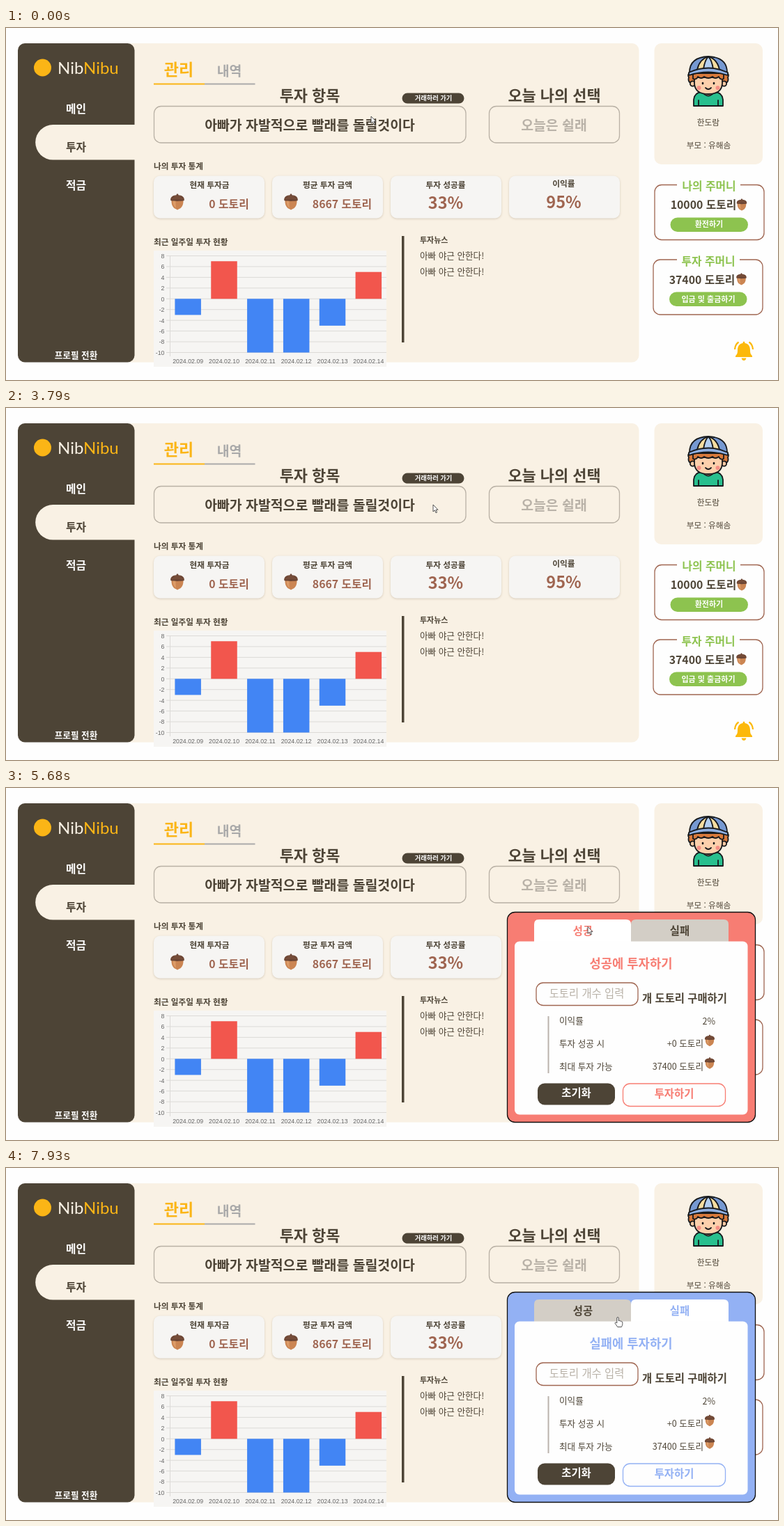
These frames come from a looping animation (1108 by 506 pixels, 8 s). An HTML page:

```html
<!DOCTYPE html>
<html lang="ko">
<head>
<meta charset="utf-8">
<title>투자 관리</title>
<style>
  html, body { margin: 0; width: 100%; height: 100%; overflow: hidden; background: #fefefe; }
  svg { display: block; width: 1108px; height: 506px; }
  /* y of every text is the middle of its glyphs */
  text {
    font: 700 12px "Noto Sans CJK KR", "Noto Sans CJK", sans-serif;
    fill: #4d4436; text-anchor: middle; transform: translateY(.38em);
  }
  .r { font-weight: 400; }
  .start { text-anchor: start; }
  .end { text-anchor: end; }
  .w { fill: #fff; }
  .dark { fill: #4d4436; }
  .cream { fill: #f9f1e4; }
  .brown { fill: #9f6550; }
  .pale { fill: #b9b2a8; }
  .green { fill: #8dc34f; }
  .box { fill: none; stroke: #b9b1a5; stroke-width: 1.3; }
  .pocket { fill: #fefefe; stroke: #9f6550; stroke-width: 1.3; }
  .s9 { font-size: 9.2px; }
  .s11 { font-size: 11px; }
  .s12 { font-size: 11.7px; }
  .s13 { font-size: 12.6px; }
  .s15 { font-size: 15.4px; }
  .s16 { font-size: 15.8px; }
  .s18 { font-size: 17.7px; }
  .s19 { font-size: 19.4px; }
  .s22 { font-size: 21.9px; }
  .s24 { font-size: 23.5px; }
  .brand { font: 400 24px Lato, sans-serif; }
  .card { fill: #f6f5f3; filter: drop-shadow(0 1px 1.5px rgba(90, 70, 40, .22)); }
  #chart text { font: 8.8px "Liberation Sans", Arial, sans-serif; fill: #666; }
  #chart path { stroke: #dcdad7; }
  #modal { --c: #f77d73; --won: #fff; --lost: #d3cec6; --wonText: var(--c); --lostText: #4d4436; }
  #modal.fail { --c: #93b1f4; --won: #d3cec6; --lost: #fff; --wonText: #4d4436; --lostText: var(--c); }
  #modal .tint { fill: var(--c); }
</style>
</head>
<body>
<svg viewBox="0 0 1108 506">
  <defs>
    <g id="acorn">
      <path d="M-8.4-3C-9 4-6.5 8.6-2.5 10L0 11.6 2.500 10C6.500 8.600 9 4 8.400-3Z" fill="#cb8552"/>
      <path d="M-6.500-2C-6.500 4-4.500 7-2 8.600-2.500 5-2.500 2-2.500-2Z" fill="#dc9c68"/>
      <path d="M-9.700-2C-10.500-7-6.500-9.600-1.500-9.800L-1-11.600H1L1.500-9.800C6.500-9.600 10.500-7 9.700-2 5-.8-5-.8-9.700-2Z" fill="#6d4634"/>
      <path d="M-7.500-4.500Q0-7 7.500-4.500M-5-7.300Q0-8.800 5-7.300" fill="none" stroke="#835740" stroke-width=".9"/>
    </g>
  </defs>

  <!-- panels and menu -->
  <rect class="cream" x="170" y="22" width="738.5" height="458.5" rx="10"/>
  <rect class="dark" x="17" y="22" width="167.5" height="458.5" rx="10"/>
  <path class="cream" d="M185 139H67.5a25.300 25.300 0 0 0 0 50.600H185Z"/>
  <circle cx="52.5" cy="57" r="12.5" fill="#fbb516"/>
  <text class="brand start" x="74" y="57" style="fill:#f9f1e4">Nib<tspan fill="#fbb516">Nibu</tspan></text>
  <text class="s16 w" x="100.5" y="116">메인</text>
  <text class="s16" x="100.5" y="171">투자</text>
  <text class="s16 w" x="100.5" y="226">적금</text>
  <text class="s13 w" x="100.5" y="470">프로필 전환</text>

  <!-- tabs and today's item -->
  <text x="248" y="59.5" style="font-size:23px;fill:#fbb516">관리</text>
  <text class="s19" x="320.5" y="62" style="fill:#a9a9a9">내역</text>
  <path d="M212 80.5H285" stroke="#fbb516" stroke-width="2.2"/>
  <path d="M285 80.5H357.5" stroke="#ababab" stroke-width="2.2"/>
  <text class="s22" x="436" y="97">투자 항목</text>
  <text class="s22" x="787" y="97">오늘 나의 선택</text>
  <rect class="dark" x="568.5" y="93.5" width="89" height="15" rx="7.5"/>
  <text class="s9 w" x="613.5" y="101">거래하러 가기</text>
  <rect class="box" x="212.5" y="112.5" width="447.5" height="52.5" rx="10"/>
  <rect class="box" x="693.5" y="112.5" width="187" height="52.5" rx="10"/>
  <text class="s19" x="436" y="139.5">아빠가 자발적으로 빨래를 돌릴것이다</text>
  <text class="s19 pale" x="786.5" y="139.5">오늘은 쉴래</text>

  <!-- statistics -->
  <text class="s12 start" x="212" y="199">나의 투자 통계</text>
  <rect class="card" x="212" y="212.5" width="159" height="61" rx="9"/>
  <rect class="card" x="382" y="212.5" width="159" height="61" rx="9"/>
  <rect class="card" x="552" y="212.5" width="159" height="61" rx="9"/>
  <rect class="card" x="722" y="212.5" width="159" height="61" rx="9"/>
  <text class="s12" x="292" y="225.5">현재 투자금</text>
  <text class="s12" x="461.5" y="225.5">평균 투자 금액</text>
  <text class="s12" x="631" y="225.5">투자 성공률</text>
  <text class="s12" x="800.5" y="223.5">이익률</text>
  <use href="#acorn" x="246" y="250"/>
  <use href="#acorn" x="409" y="250"/>
  <text class="s16 brown" x="320" y="253">0 도토리</text>
  <text class="s16 brown" x="482.5" y="253">8667 도토리</text>
  <text class="s24 brown" x="631" y="251.5">33%</text>
  <text class="s24 brown" x="800.5" y="250.5">95%</text>

  <text class="s12 start" x="212" y="307.5">최근 일주일 투자 현황</text>
  <g id="chart"><rect x="212" y="320" width="334" height="167" fill="#f6f5f3"/></g>

  <rect class="dark" x="568" y="299" width="3.5" height="153"/>
  <text class="s11 start" x="594" y="305">투자뉴스</text>
  <text class="s13 r start" x="594" y="327.5">아빠 야근 안한다!</text>
  <text class="s13 r start" x="594" y="350.5">아빠 야근 안한다!</text>

  <!-- profile -->
  <rect class="cream" x="930.5" y="22" width="155.5" height="174" rx="10"/>
  <g stroke="#17191c" stroke-width="1.8" stroke-linejoin="round" stroke-linecap="round">
    <path d="M987 112V103Q988 93 998 92H1018Q1028 93 1029 103V112Z" fill="#28bf8e"/>
    <path d="M999 92Q1008 103 1017 92Z" fill="#fbc9a3"/>
    <path d="M994 104V112M1022 104V112" fill="none"/>
    <path d="M984 62Q977 66 980 71 978 77 984 80H1032Q1038 77 1036 71 1039 66 1032 62Z" fill="#d87a3c"/>
    <circle cx="985.5" cy="80" r="3.6" fill="#fbc9a3"/>
    <circle cx="1030.5" cy="80" r="3.6" fill="#fbc9a3"/>
    <path d="M988 69V80Q989 95 1008 95 1027 95 1028 80V69Z" fill="#fdd0ac"/>
    <path d="M986 65V73Q991 75 993 70 998 74 1002 70 1008 74 1014 70 1018 74 1023 70 1025 75 1030 73V65Z" fill="#d87a3c"/>
    <path d="M981 64Q981 42 1008 41 1035 42 1035 64Z" fill="#7699d2"/>
    <path d="M992 60Q995 45 1008 41 1021 45 1024 60Z" fill="#f6dda0"/>
    <path d="M1001 59Q1003 46 1008 41 1013 46 1015 59Z" fill="#b4cff0"/>
    <path d="M980 64Q1008 51 1036 64V68Q1008 59 980 68Z" fill="#8fb0e2"/>
    <path d="M1004 86Q1008 90 1012 86" fill="none"/>
    <path d="M1000 79V80M1016 79V80" stroke-width="2.6"/>
  </g>
  <circle cx="994.5" cy="86" r="3" fill="#f58f86"/>
  <circle cx="1021.5" cy="86" r="3" fill="#f58f86"/>
  <text class="s12 r" x="1008" y="135.5">한도람</text>
  <text class="s12 r" x="1008.5" y="168.5">부모 : 유해솜</text>

  <!-- pockets -->
  <rect class="pocket" x="931" y="225.5" width="157" height="79" rx="10"/>
  <rect class="pocket" x="929" y="333" width="157" height="79" rx="10"/>
  <path d="M963 225.5H1054M963 333H1053" stroke="#fefefe" stroke-width="4"/>
  <text class="s16 green" x="1009" y="227">나의 주머니</text>
  <text class="s16 green" x="1008" y="334.5">투자 주머니</text>
  <text class="s16" x="1001" y="254">10000 도토리</text>
  <text class="s16" x="999" y="361.5">37400 도토리</text>
  <use href="#acorn" transform="translate(1056 254) scale(.74)"/>
  <use href="#acorn" transform="translate(1055.5 361) scale(.74)"/>
  <rect class="green" x="953.5" y="272.5" width="111.5" height="20.5" rx="10.2"/>
  <rect class="green" x="952" y="379.5" width="111.5" height="20.5" rx="10.2"/>
  <text class="s11 w" x="1009" y="282">환전하기</text>
  <text class="s11 w" x="1008" y="390">입금 및 출금하기</text>

  <!-- bell -->
  <path d="M1057.5 453Q1057.5 450.5 1059 450.5T1060.5 453C1066 454 1068 458 1068 463 1068 468 1069 469 1071 471.5V473H1047V471.5C1049 469 1050 468 1050 463 1050 458 1052 454 1057.5 453ZM1055.5 474.5H1062.5Q1061.5 478 1059 478T1055.5 474.5Z" fill="#fcb90b"/>
  <path d="M1051.5 451.5Q1046.5 455 1046 462M1066.5 451.5Q1071.5 455 1072 462" fill="none" stroke="#fcb90b" stroke-width="2.2"/>

  <!-- trade dialog -->
  <g id="modal" visibility="hidden">
    <rect class="tint" x="719.5" y="178.5" width="356" height="302" rx="11" stroke="#111" stroke-width="1.3"/>
    <path d="M758 221V196q0-7 7-7H890q7 0 7 7V221Z" style="fill:var(--won)"/>
    <path d="M897 221V196q0-7 7-7H1030q7 0 7 7V221Z" style="fill:var(--lost)"/>
    <rect x="730" y="220.5" width="334.5" height="249" rx="7" fill="#fefefe"/>
    <text class="s15" x="828" y="205.5" style="fill:var(--wonText)">성공</text>
    <text class="s15" x="967" y="205.5" style="fill:var(--lostText)">실패</text>
    <text class="s18 tint" x="897" y="252.5" id="heading"></text>
    <rect class="pocket" x="761" y="280" width="146" height="32.5" rx="10"/>
    <text class="s15 r pale" x="833.5" y="295">도토리 개수 입력</text>
    <text class="s15" x="974" y="302">개 도토리 구매하기</text>
    <path d="M778.5 328V410" stroke="#bbb3ad" stroke-width="2"/>
    <text class="s13 r start" x="794" y="334.5">이익률</text>
    <text class="s13 r start" x="794" y="367.5">투자 성공 시</text>
    <text class="s13 r start" x="794" y="400.5">최대 투자 가능</text>
    <text class="s13 r end" x="1018" y="335.5">2%</text>
    <text class="s13 r end" x="1001" y="367.5">+0 도토리</text>
    <text class="s13 r end" x="1001" y="400">37400 도토리</text>
    <use href="#acorn" transform="translate(1010 363) scale(.72)"/>
    <use href="#acorn" transform="translate(1010 395.5) scale(.72)"/>
    <rect class="dark" x="763" y="424.5" width="111" height="31" rx="10"/>
    <text class="s15 w" x="818.5" y="438.5">초기화</text>
    <rect x="885.5" y="425" width="147" height="32.5" rx="10" fill="#fefefe" stroke-width="1.3" style="stroke:var(--c)"/>
    <text class="s15 tint" x="959" y="439.5">투자하기</text>
  </g>

  <!-- pointer -->
  <g id="pointer">
    <circle id="click" cx="-1" cy="1" r="9" fill="#f0e62d" fill-opacity=".8"/>
    <path id="arrow" d="M0 0V10L2.3 7.9 4 11.7 5.6 11 4 7.3H7Z" fill="#fff" stroke="#2b2b2b" stroke-width=".8"/>
    <path id="hand" d="M-1.2 9V1.2Q0-.4 1.2 1.2V5.5Q2.6 4.8 3.4 6 5 5.5 5.4 6.8 6.8 6.7 6.8 8.2V10.5Q6.5 12.5 5.4 14.5H-.3Q-1.8 12-3.8 9.5-4.2 7.9-2.8 7.9-1.8 8-1.2 9Z" fill="#fff" stroke="#2b2b2b" stroke-width=".8"/>
  </g>
</svg>
<script>
  const $ = id => document.getElementById(id);
  const TICK = 1000 / 15, LOOP = 8000;

  function buildChart() {
    const values = [-3, 7, -10, -10, -5, 5];
    const yOf = v => 389.3 - v * 7.72;
    const slot = 311 / values.length;
    let html = '<path d="M235.5 327V472"/>';
    for (let v = 8; v >= -10; v -= 2) {
      html += `<path d="M230 ${yOf(v)}H546"/><text class="end" x="227.5" y="${yOf(v)}">${v}</text>`;
    }
    values.forEach((v, i) => {
      const mid = 235.3 + slot * (i + .5);
      const day = String(9 + i).padStart(2, '0');
      html += `<rect x="${mid - 18.8}" y="${yOf(Math.max(v, 0))}" width="37.5" height="${Math.abs(v) * 7.72}"
        fill="${v < 0 ? '#4285f4' : '#f2564d'}"/><text x="${mid}" y="479">2024.02.${day}</text>`;
    });
    $('chart').insertAdjacentHTML('beforeend', html);
  }

  // tick, x, y, hand shape
  const route = [
    [0, 524, 127], [3, 524, 127], [8, 546, 119], [9, 546, 119], [10, 544, 117],
    [15, 577, 92], [22, 600, 89], [27, 604, 98], [29, 604, 98],
    [30, 609, 101, 1], [32, 609, 101, 1], [33, 611, 108], [38, 621, 132], [46, 621, 132],
    [47, 616, 137], [51, 616, 137], [53, 608, 130], [56, 608, 130],
    [57, 613, 139], [61, 560, 116], [65, 611, 97, 1], [72, 611, 97, 1],
    [73, 611, 98], [77, 611, 98], [84, 790, 180], [87, 925, 238], [90, 950, 215],
    [91, 953, 215, 1], [105, 953, 215, 1], [106, 946, 224], [109, 923, 250], [111, 923, 250],
    [116, 886, 220, 1], [119, 878, 214, 1], [120, 878, 214, 1]
  ];

  const show = (id, on) => $(id).setAttribute('visibility', on ? 'visible' : 'hidden');

  function draw() {
    const t = performance.now() % LOOP;
    const k = Math.min(119, Math.floor((t + 14) / TICK));
    const i = route.findIndex(p => p[0] > k);
    const [k0, x0, y0, hand] = route[i - 1], [k1, x1, y1] = route[i];
    const p = (k - k0) / (k1 - k0);
    $('pointer').setAttribute('transform', `translate(${x0 + (x1 - x0) * p} ${y0 + (y1 - y0) * p})`);
    show('hand', hand);
    show('arrow', !hand);
    show('click', k === 71 || k === 72 || k === 100 || k === 101);

    const fail = k >= 102;
    show('modal', k >= 73);
    $('modal').setAttribute('class', fail ? 'fail' : '');
    $('heading').textContent = (fail ? '실패' : '성공') + '에 투자하기';
    requestAnimationFrame(draw);
  }

  buildChart();
  draw();
</script>
</body>
</html>
```
